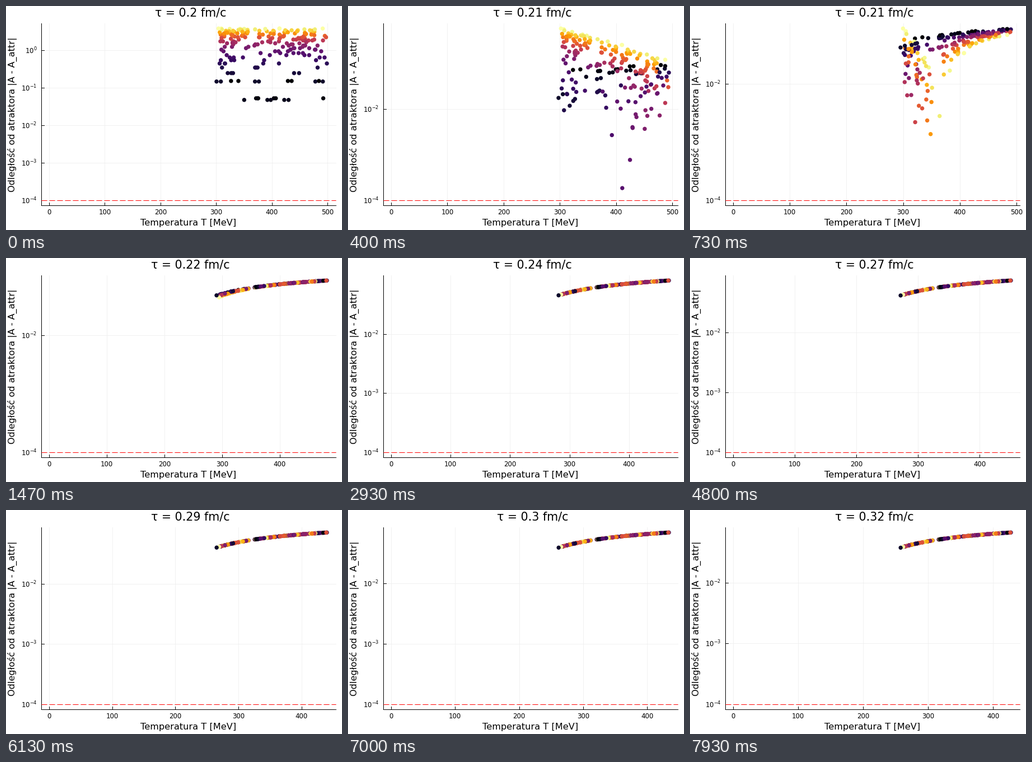
A matplotlib script that plays this animation: 600x400 px, repeating every 8 s.

```python
import math

import matplotlib.pyplot as plt
import numpy as np
from matplotlib.animation import FuncAnimation

W, H, DPI = 600, 400, 100
LOOP, STEPS, HOLD = 8000, 120, 3   # each step is held for three short frames
FRAMES = STEPS * HOLD
LEFT, RIGHT, TOP, BOTTOM = 63, 588.5, 31, 355.7
X_ZERO, X_MAX = 76.9, 573.0        # pixels of T = 0 and of the hottest point
Y_FLOOR, Y_MAX = 346.6, 40.2       # pixels of 1e-4 and of the largest distance
FLOOR = -4
TAU0, DTAU, SUBSTEPS = 0.2, 0.001, 6
ETA = 6.0                          # 8 * C_eta
T_REF = 200.0
COUNT, A_MAX = 200, 4.0

plt.rcParams["font.family"] = "DejaVu Sans"


def px(size):
    return size * 72 / DPI


def initial_state():
    """Anisotropy on a 0.1 grid, temperature in MeV with one narrow gap."""
    rng = np.random.default_rng(11)
    a = np.arange(COUNT) % 41 / 10
    t = rng.uniform(303, 486, COUNT)
    t[t > 358] += 9
    order = rng.permutation(COUNT)
    # extremes of the cloud, drawn on top
    edge = [(4.0, 304), (0.6, 498.5), (0.3, 300.5), (0.1, 492), (2.4, 497)]
    return np.vstack([np.column_stack([a, t])[order], edge]).T


def flow(tau, state):
    a, t = state
    return np.array([ETA / tau - t * a, t / tau * (a / 18 - 1 / 3)])


def evolve():
    state, tau = initial_state(), TAU0
    h = DTAU / SUBSTEPS
    history = [state]
    for _ in range(STEPS - 1):
        for _ in range(SUBSTEPS):
            k1 = flow(tau, state)
            k2 = flow(tau + h / 2, state + h / 2 * k1)
            k3 = flow(tau + h / 2, state + h / 2 * k2)
            k4 = flow(tau + h, state + h * k3)
            state = state + h / 6 * (k1 + 2 * k2 + 2 * k3 + k4)
            tau += h
        history.append(state)
    return history


def attractor(tau):
    w = tau * T_REF * (TAU0 / tau) ** (1 / 3)
    return ETA / w + 2 / 3 * ETA / w ** 2


HISTORY = evolve()

fig = plt.figure(figsize=(W / DPI, H / DPI), dpi=DPI, facecolor="white")
ax = fig.add_axes([0, 0, 1, 1])
ax.set_xlim(0, W)
ax.set_ylim(H, 0)
ax.axis("off")


def line(xs, ys, color="black", width=1.0, z=3, **kw):
    return ax.plot(xs, ys, color=color, lw=px(width), zorder=z, **kw)[0]


def label(x, y, text, size, ha="center", **kw):
    kw.setdefault("va", "baseline")
    return ax.text(x, y, text, fontsize=px(size), ha=ha, **kw)


line([LEFT, LEFT], [TOP, BOTTOM], solid_capstyle="projecting")
line([LEFT, RIGHT], [BOTTOM, BOTTOM], solid_capstyle="projecting")
line([LEFT, RIGHT], [Y_FLOOR, Y_FLOOR], "red", 1.0, 4,
     dashes=(10, 4), dash_capstyle="butt")
label(326, 392, "Temperatura T [MeV]", 16.1)
label(11, 193.5, "Odległość od atraktora |A - A_attr|", 16.1,
      rotation=90, va="center")
title = label(329.7, 18.3, "", 20.6)

colors = HISTORY[0][0]
dots = ax.scatter(np.zeros_like(colors), np.zeros_like(colors), c=colors,
                  cmap="inferno", vmin=0, vmax=A_MAX, s=px(7.4) ** 2,
                  linewidths=0, zorder=5)
moving = []


def x_tick(x, text):
    moving.append(line([x, x], [TOP, BOTTOM], "#eeeeee", 0.8, 1))
    moving.append(line([x, x], [BOTTOM - 5, BOTTOM]))
    moving.append(label(x, 372, text, 11.7))


def y_tick(y, power):
    moving.append(line([LEFT, RIGHT], [y, y], "#eeeeee", 0.8, 1))
    moving.append(line([LEFT, LEFT + 5], [y, y]))
    moving.append(label(55.2, y + 6.2, rf"$\mathdefault{{10^{{{power}}}}}$",
                        11.7, ha="right"))


def draw(i):
    while moving:
        moving.pop().remove()
    step = min((i + 1) // HOLD, STEPS - 1)
    tau = TAU0 + DTAU * step
    a, t = HISTORY[step]
    logs = np.log10(np.abs(a - attractor(tau)) + 1e-12)

    x_scale = (X_MAX - X_ZERO) / t.max()
    y_scale = (Y_FLOOR - Y_MAX) / (logs.max() - FLOOR)
    y = Y_FLOOR - (logs - FLOOR) * y_scale
    y[y > BOTTOM] = np.nan
    dots.set_offsets(np.column_stack([X_ZERO + t * x_scale, y]))

    for temp in range(0, 501, 100):
        x = X_ZERO + temp * x_scale
        if x <= RIGHT:
            x_tick(x, str(temp))

    # four whole decades are labelled at every second one
    highest = math.floor(FLOOR + (Y_FLOOR - TOP) / y_scale)
    stride = 2 if highest - FLOOR == 3 else 1
    for power in range(FLOOR, highest + 1, stride):
        y_tick(Y_FLOOR - (power - FLOOR) * y_scale, power)

    title.set_text(f"τ = {round(tau, 2)} fm/c")
    return [dots, title, *moving]


anim = FuncAnimation(fig, draw, frames=FRAMES, interval=LOOP / FRAMES,
                     repeat=True, repeat_delay=0, blit=False)
plt.show()
```
